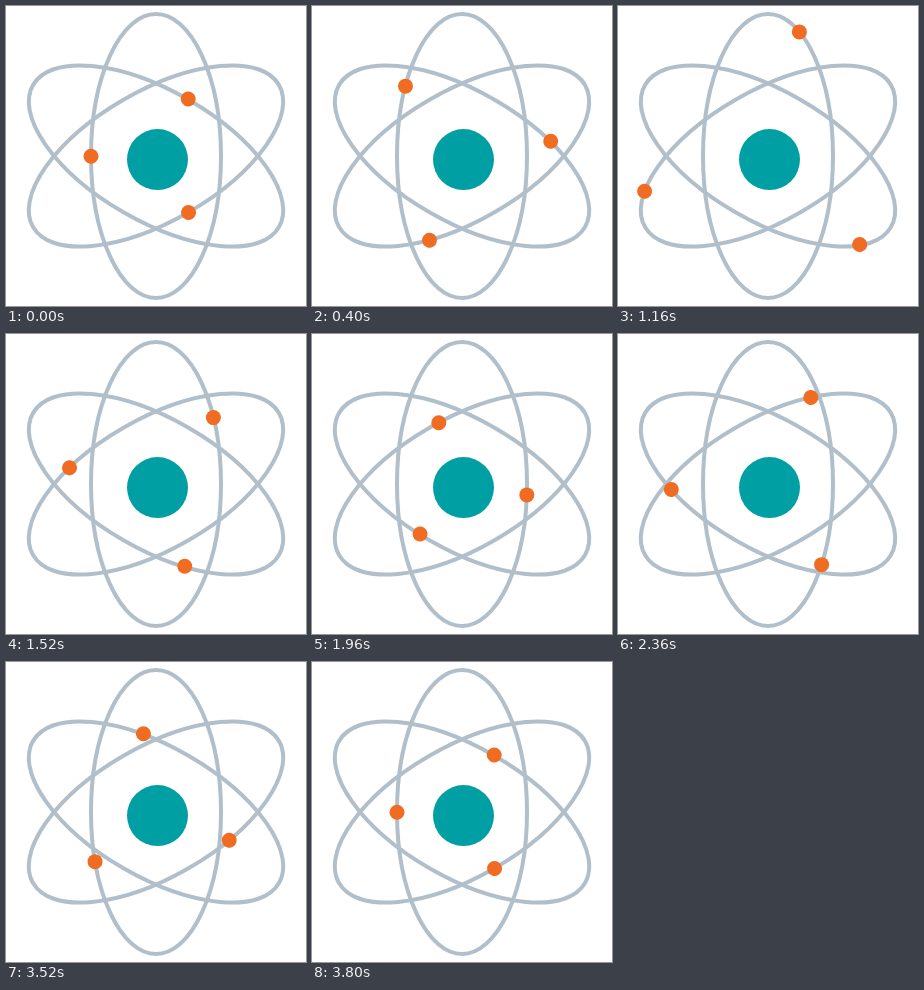
Write an HTML page that moves like this. It is 300x300 px and loops after 3.88 s.

```html
<!DOCTYPE html>
<html lang="en">
<head>
<meta charset="utf-8">
<title>Atom</title>
<style>
  html, body { margin: 0; width: 100%; height: 100%; overflow: hidden; background: #fff; }
  svg { display: block; width: 100vw; height: 100vh; }
</style>
</head>
<body>
<svg viewBox="0 0 300 300">
  <defs>
    <path id="orbit" d="M-65 0A65 142 0 0 1 65 0A65 142 0 0 1 -65 0Z"/>
  </defs>
  <g transform="translate(150 150)" fill="none" stroke="#b1bfca" stroke-width="4">
    <use href="#orbit"/>
    <use href="#orbit" transform="rotate(120)"/>
    <use href="#orbit" transform="rotate(-120)"/>
  </g>
  <circle cx="151.5" cy="153.6" r="30.5" fill="#009fa3"/>
  <g fill="#f06c23">
    <circle class="electron" r="7.5" transform="translate(150 150.3)"/>
    <circle class="electron" r="7.5" transform="translate(149.7 149.2) rotate(120)"/>
    <circle class="electron" r="7.5" transform="translate(150 150.2) rotate(-120)"/>
  </g>
</svg>
<script>
  const LOOP = 3880, STEP = 40, STEPS = 95;
  const orbit = document.getElementById('orbit');
  const electrons = document.querySelectorAll('.electron');
  const perimeter = orbit.getTotalLength();

  // Constant speed along the orbit, in 25 fps steps; the last pose is held.
  function draw(time) {
    const step = Math.min(STEPS, Math.floor((time % LOOP + 2) / STEP));
    const p = orbit.getPointAtLength(perimeter * (step % STEPS) / STEPS);
    for (const e of electrons) {
      e.setAttribute('cx', p.x);
      e.setAttribute('cy', p.y);
    }
  }

  function tick(now) {
    draw(now);
    requestAnimationFrame(tick);
  }
  draw(0);
  requestAnimationFrame(tick);
</script>
</body>
</html>
```
